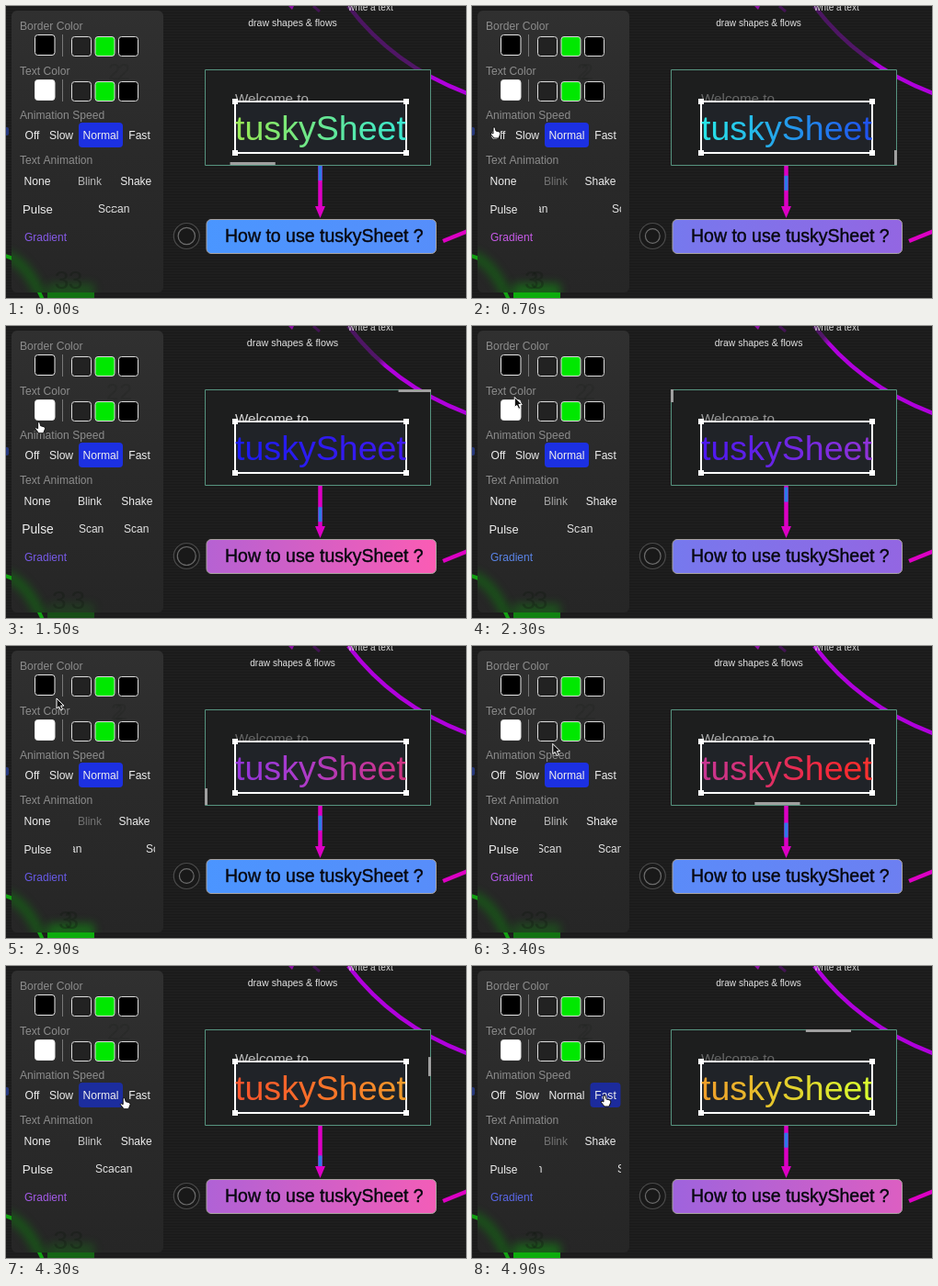
Recreate the animation shown at these times as an HTML page with a canvas. Size 500 px wide and 318 px high, loop 5 s.

```html
<!DOCTYPE html>
<html lang="en">
<head>
<meta charset="utf-8">
<title>Diagram editor</title>
<style>
  html, body { margin: 0; width: 100%; height: 100%; overflow: hidden; background: #1e1e1e; }
  canvas { display: block; width: 500px; height: 318px; }
</style>
</head>
<body>
<canvas id="stage" width="500" height="318"></canvas>
<script>
const ctx = document.getElementById('stage').getContext('2d');
const LOOP = 5000, PULSE = 2200;
const FONT = '"Liberation Sans", Arial, sans-serif';
const BRAND = 'tuskySheet';
const MAGENTA = '#dc00c4', VIOLET = '#b000dc';

const TITLE_COLORS = [
  [168, 232, 60], [40, 232, 232], [28, 28, 240], [75, 24, 240],
  [168, 60, 208], [248, 40, 48], [248, 124, 40], [216, 255, 48]
];
const BUTTON_COLORS = [[74, 150, 255], [150, 100, 225], [255, 92, 178]];
const CURSOR_PATH = [
  { t: 400, x: 0, y: 140 }, { t: 700, x: 23, y: 132 }, { t: 2900, x: 55, y: 57 },
  { t: 3800, x: 114, y: 146 }, { t: 4900, x: 143, y: 141 }
];

const lerp = (a, b, f) => a + (b - a) * f;

// Swings between -1 and 1, with its crest at `peak`.
const wave = (t, peak = 1700, period = PULSE) => Math.cos(2 * Math.PI * (t - peak) / period);

// Colour at position u along a list of evenly spaced colours.
function blend(colors, u) {
  const i = Math.min(Math.floor(u), colors.length - 2);
  const f = Math.min(1, u - i);
  return `rgb(${colors[i].map((c, k) => Math.round(lerp(c, colors[i + 1][k], f)))})`;
}

function sweep(x1, x2, colors, from, to) {
  const g = ctx.createLinearGradient(x1, 0, x2, 0);
  for (let f = 0; f <= 1; f += .125) g.addColorStop(f, blend(colors, lerp(from, to, f)));
  return g;
}

function text(str, x, y, size, color, align = 'left') {
  ctx.font = `${size}px ${FONT}`;
  ctx.textAlign = align;
  ctx.fillStyle = color;
  ctx.fillText(str, x, y);
}

function box(x, y, w, h, radius, fill, stroke, width = 1) {
  ctx.beginPath();
  ctx.roundRect(x, y, w, h, radius);
  if (fill) { ctx.fillStyle = fill; ctx.fill(); }
  if (stroke) { ctx.strokeStyle = stroke; ctx.lineWidth = width; ctx.stroke(); }
}

function line(color, width, x1, y1, x2, y2) {
  ctx.beginPath();
  ctx.moveTo(x1, y1);
  ctx.lineTo(x2, y2);
  ctx.strokeStyle = color;
  ctx.lineWidth = width;
  ctx.stroke();
}

function polygon(points, fill, stroke) {
  ctx.beginPath();
  points.forEach(([x, y]) => ctx.lineTo(x, y));
  ctx.closePath();
  ctx.fillStyle = fill;
  ctx.fill();
  if (stroke) { ctx.strokeStyle = stroke; ctx.lineWidth = 1; ctx.stroke(); }
}

function clipped(x, y, w, h, draw) {
  ctx.save();
  ctx.beginPath();
  ctx.rect(x, y, w, h);
  ctx.clip();
  draw();
  ctx.restore();
}

function background() {
  ctx.fillStyle = '#1e1e1e';
  ctx.fillRect(0, 0, 500, 318);
  for (let y = 1; y < 318; y += 3) line('rgba(0,0,0,.12)', 1, 0, y + .5, 500, y + .5);
}

// The bright part grows from the lower end until it covers the whole curve.
function topCurve(t) {
  const start = Math.max(0, .75 * (1 - t / 2900));
  const paint = ctx.createLinearGradient(372, 0, 500, 95);
  paint.addColorStop(0, start > 0 ? '#4a1660' : VIOLET);
  paint.addColorStop(Math.max(0, start - .06), start > 0 ? '#521668' : VIOLET);
  paint.addColorStop(start, VIOLET);
  ctx.beginPath();
  ctx.moveTo(372, 0);
  ctx.bezierCurveTo(396, 32, 435, 70, 501, 95);
  ctx.strokeStyle = paint;
  ctx.lineWidth = 4.5;
  ctx.stroke();
  line('#421452', 3, 334, 0, 341, 6);
  polygon([[307, 0], [313, 0], [311, 4]], '#8a10a0');
}

function topLabels(t) {
  text('draw shapes & flows', 311.5, 22, 10.5 + .4 * wave(t), '#e2e2e2', 'center');
  text('write a text', 372, 5, 10.1, '#d8d8d8');
}

// A grey bar runs along the frame, one side after another, anticlockwise.
function runner(t) {
  const x = 216, y = 69, w = 246, h = 104;
  const u = .26 + t * .00124;
  const side = Math.floor(u) % 4, p = (u % 1) * 1.2 - .2;
  const bars = [
    [x + p * w, y + h - 3, w * .2, 3],
    [x + w - 3, y + h - (p + .2) * h, 3, h * .2],
    [x + w - (p + .2) * w, y, w * .2, 3],
    [x, y + p * h, 3, h * .2]
  ];
  clipped(x, y, w, h, () => {
    ctx.fillStyle = '#a0a0a0';
    ctx.fillRect(...bars[side]);
  });
}

function titleCard(t) {
  box(216.5, 69.5, 245, 104, 0, '#1d1e1e', '#56937f');
  runner(t);
  text('Welcome to', 249, 106, 15.2, `rgba(235,235,235,${.64 + .3 * wave(t)})`);

  box(249, 104, 186, 56, 0, '#202328', '#fff', 2);
  const u = (t + 100) / 800;
  text(BRAND, 249, 146, 37.6, sweep(249, 435, TITLE_COLORS, u, u + .75));
  ctx.fillStyle = '#fff';
  for (const x of [249, 435]) for (const y of [104, 160]) ctx.fillRect(x - 3, y - 3, 6, 6);
}

function arrows(t) {
  line(MAGENTA, 4.5, 341.5, 174, 341.5, 220);
  const y = 174 + (t % PULSE) / PULSE * 34;
  line('#2a7ce8', 4, 341.5, y, 341.5, Math.min(y + 16, 218));
  polygon([[336, 218], [347, 218], [341.5, 231]], MAGENTA);
  line(MAGENTA, 4.5, 475, 256, 501, 245.5);
}

function howToButton(t) {
  const label = `How to use ${BRAND} ?`;
  const s = Math.sin(Math.PI * t / 3000) ** 2;
  const left = 1.3 * s, right = .16 + 1.8 * s;
  box(218, 232.5, 249.5, 37, 5, sweep(218, 468, BUTTON_COLORS, left, right), '#a9a3a0');
  text(label, 238, 257, 19.5, '#080810');
  ctx.strokeStyle = '#080810';
  ctx.lineWidth = .4;
  ctx.strokeText(label, 238, 257);
}

function ring(t) {
  for (const [r, color] of [[14, '#4c4c4c'], [9 + 1.2 * wave(t), '#6c6c6c']]) {
    ctx.beginPath();
    ctx.arc(196.3, 250.5, r, 0, Math.PI * 2);
    ctx.fillStyle = '#191919';
    ctx.fill();
    ctx.strokeStyle = color;
    ctx.lineWidth = 1.2;
    ctx.stroke();
  }
}

function leftCurve(color, width) {
  ctx.beginPath();
  ctx.moveTo(-2, 272);
  ctx.bezierCurveTo(12, 274, 26, 288, 40, 320);
  ctx.strokeStyle = color;
  ctx.lineWidth = width;
  ctx.stroke();
}

// Frosted panel: shapes below it shine through blurred.
function panel(t) {
  const lit = .5 - .28 * wave(t);
  leftCurve('#12a012', 4);
  box(-4, 132, 7, 9, 2, '#26387c');
  box(45, 286, 51, 40, 3, `rgba(8,216,8,${lit})`);

  const shade = ctx.createLinearGradient(0, 5, 0, 312);
  shade.addColorStop(0, '#303030');
  shade.addColorStop(.5, '#2a2a2a');
  shade.addColorStop(1, '#262626');
  box(6, 5, 165, 307, 6, shade);

  clipped(6, 5, 165, 307, () => {
    ctx.filter = 'blur(5px)';
    leftCurve('rgba(0,170,0,.35)', 11);
    box(45, 302, 51, 30, 3, `rgba(8,190,8,${lit * .5})`);
    ctx.filter = 'none';
    const spread = 14 * (1 - lit);
    for (const dir of [-1, 1]) {
      text('3', 68 + dir * spread, 308, 28, 'rgba(18,26,18,.35)', 'center');
      text('2', 123 + dir * spread * .7, 80, 24, 'rgba(20,28,20,.15)', 'center');
    }
  });
}

function swatches(y, first) {
  box(31.5, y + .5, 21.5, 22, 3, first, '#e8e8e8');
  line('#777', 1, 61.5, y, 61.5, y + 24);
  ['#222', '#00e800', '#000'].forEach((color, i) =>
    box(71.5 + i * 25.5, y + 2.5, 21, 21, 3, color, '#ddd'));
}

function speedButtons(t) {
  if (t >= 4400) box(128.5, 127, 33, 27, 4, '#1c2b9c');
  else box(79, 127, 48, 27, 4, t >= 3600 ? '#1c2d9e' : '#1c30e2');
  [['Off', 28.5], ['Slow', 60], ['Normal', 103], ['Fast', 145]].forEach(([label, x]) =>
    text(label, x, 145, 12.1, '#eee', 'center'));
}

// Two copies leave the middle quickly and slide back, each visible only on its own half.
function scanLabel(t) {
  const phase = (t - 120 + PULSE) % PULSE / PULSE;
  const gap = 56 * Math.min(phase / .15, (1 - phase) / .85);
  clipped(73, 208, 44, 26, () => text('Scan', 103.5 - gap, 225, 12, '#e4e4e4'));
  clipped(117, 208, 45, 26, () => text('Scan', 103.5 + gap, 225, 12, '#e4e4e4'));
}

function textAnimations(t) {
  const w = wave(t);
  text('None', 34, 195, 12.1, '#eee', 'center');
  text('Blink', 91, 195, 12, `rgba(238,238,238,${.68 + .32 * w})`, 'center');
  text('Shake', 124 + 1.6 * w, 195, 12, '#eee');
  text('Pulse', 34.5, 225.5, 13 + w, '#eee', 'center');
  scanLabel(t);
  text('Gradient', 20, 256, 12, `hsl(${254 + 32 * wave(t, 700, 3100)} 75% 63%)`);
}

function controls(t) {
  [['Border Color', 26], ['Text Color', 75], ['Animation Speed', 123], ['Text Animation', 172]]
    .forEach(([label, y]) => text(label, 15, y, 12.1, '#8c8c8c'));
  swatches(31, '#000');
  swatches(80, '#fff');
  speedButtons(t);
  textAnimations(t);
}

function cursor(t) {
  const next = CURSOR_PATH.findIndex(p => p.t >= t);
  if (next < 1) return;
  const a = CURSOR_PATH[next - 1], b = CURSOR_PATH[next];
  const f = (t - a.t) / (b.t - a.t);
  ctx.save();
  ctx.translate(lerp(a.x, b.x, f), lerp(a.y, b.y, f));
  const pointing = t < 1900 || t >= 3500;
  if (pointing) {
    polygon([[0, 0], [2, 0], [3, 4], [7, 5], [8, 7], [6, 12], [1, 12], [-3, 7], [-2, 6], [0, 7]],
      '#fff', '#111');
  } else {
    polygon([[0, 0], [0, 11], [2.5, 9], [4.5, 13], [6.5, 12], [4.6, 8], [8, 8]], '#111', '#fff');
  }
  ctx.restore();
}

// The picture rests briefly at the start, then advances ten times a second.
function stepped(t) {
  if (t < 400) return 0;
  return t < 700 ? 400 : Math.floor(t / 100) * 100;
}

function render(now) {
  const t = stepped(now % LOOP);
  [background, topCurve, topLabels, titleCard, arrows, howToButton, ring, panel, controls, cursor]
    .forEach(draw => draw(t));
  requestAnimationFrame(render);
}
requestAnimationFrame(render);
</script>
</body>
</html>
```
